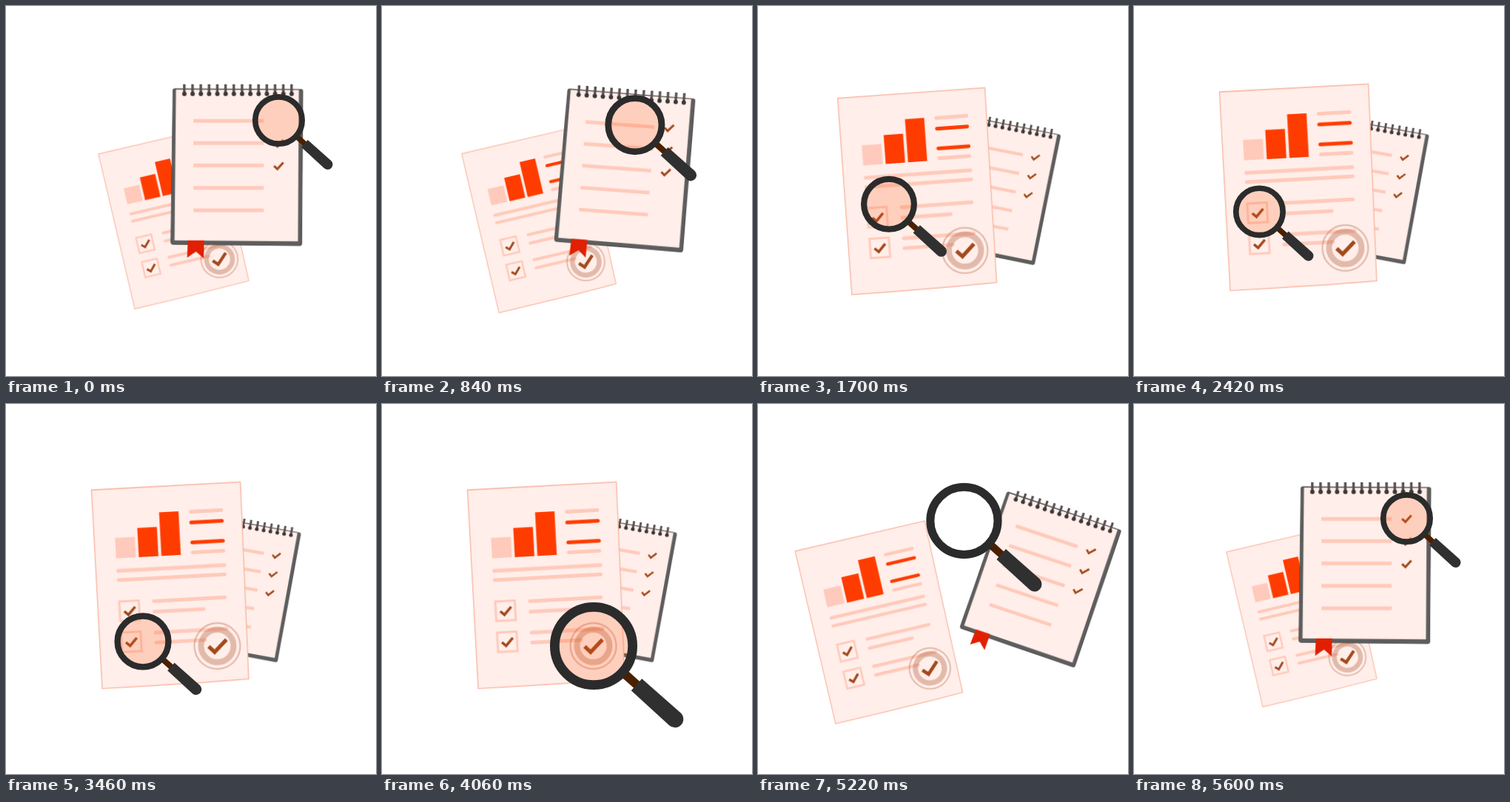
An HTML page without scripts that plays this animation: 500 px wide and 500 px high, repeating every 5620 ms.

```html
<!DOCTYPE html>
<html lang="en">
<head>
<meta charset="utf-8">
<title>Report check</title>
<style>
  html, body { margin: 0; width: 100%; height: 100%; overflow: hidden; background: #fff; }
  svg { position: absolute; left: 0; top: 0; width: 500px; height: 500px; }

  .report, .pad, .lens, .pad-layer, .draw {
    animation: 5620ms cubic-bezier(.65, 0, .35, 1) infinite;
  }
  .report { animation-name: report; }
  .pad { animation-name: pad; }
  .lens { animation-name: lens-move, lens-size; }
  .pad-layer { animation-name: stack; }
  .draw { stroke-dasharray: 1 2; animation-name: draw; animation-timing-function: ease-in-out; }
  .report-layer { z-index: 1; }
  .lens-layer { z-index: 3; }

  @keyframes report {
    0%, 10.68%, 99.64%, 100% { transform: translate(226.5px, 285.5px) rotate(-13.2deg) scale(.8); }
    22.06%, 87.9%, 90.39% { transform: translate(157.3px, 295px) rotate(-13.2deg) scale(.9); }
    33.63%, 73.84% { transform: translate(221.75px, 243.75px) rotate(-3.1deg) scale(1); }
  }
  @keyframes pad {
    0%, 10.68%, 99.64%, 100% { transform: translate(312.25px, 217.75px) rotate(0deg) scale(1); }
    22.06%, 87.9%, 90.39% { transform: translate(388.5px, 239px) rotate(20.2deg) scale(.92); }
    33.63%, 73.84% { transform: translate(309.6px, 248.3px) rotate(10deg) scale(.84); }
  }
  @keyframes lens-move {
    0%, 10.68%, 99.64%, 100% { translate: 368.5px 154.5px; }
    22.06% { translate: 242px 184px; }
    33.63%, 41.99% { translate: 169.5px 277.5px; }
    51.96%, 58.54% { translate: 170px 320px; }
    68.15%, 73.31% { translate: 286px 327px; }
    87.46%, 91.1% { translate: 274px 158px; }
  }
  @keyframes lens-size {
    0%, 10.68%, 33.63%, 58.54%, 99.29%, 100% { scale: 1; }
    22.06%, 68.15%, 87.9% { scale: 1.66; }
  }
  /* the pad and the report change places while they are apart */
  @keyframes stack {
    0%, 22.06%, 90.39%, 100% { z-index: 2; }
    22.07%, 90.38% { z-index: 0; }
  }
  @keyframes draw {
    0%, .5% { stroke-dashoffset: 1.02; }
    10.2%, 100% { stroke-dashoffset: 0; }
  }

  .paper { fill: #ffeee9; }
  .pale { fill: #ffcabb; }
  .hot { fill: #ff3c00; }
  .rule { fill: none; stroke: #ffcabb; stroke-width: 5; }
  .round { stroke-linecap: round; }
  .hot-rule { stroke: #ff3c00; }
  .box { stroke-width: 3; }
  .tick { fill: none; stroke: #a34a1e; stroke-width: 3; }
  .big { stroke-width: 5.2; }
  .seal { fill: none; stroke: #a8512b; stroke-opacity: .33; }
</style>
</head>
<body>

<svg class="report-layer" viewBox="0 0 500 500">
  <defs>
    <path id="tick" pathLength="1" d="M-6 0L-1.5 4.2L6.5-4.5"/>
    <path id="sheet" d="M-99.2-133.3L102.3-133L99.2 133.3Q30 135.6-99.2 135.6Z"/>
  </defs>
  <g class="report">
    <use href="#sheet" class="paper" stroke="#f9b8a4" stroke-width="1.4"/>
    <rect class="pale" x="-71" y="-66.7" width="26.8" height="27.6"/>
    <rect class="hot" x="-40.2" y="-78.5" width="26.5" height="39.5"/>
    <rect class="hot" x="-9.6" y="-98" width="26.2" height="59"/>
    <path class="rule round" d="M33-96.5H74.5M33-41.5H74.5M-69-22H74.5M-69-9.5H74.5
      M-23 21.6H73M-23 35.8H43.4M-23 64H73M-23 77.6H43"/>
    <path class="rule round hot-rule" d="M33-82H74.5M33-55H74.5"/>
    <rect class="rule box" x="-69.9" y="19.5" width="26.4" height="26.4"/>
    <rect class="rule box" x="-69.7" y="61.5" width="26.4" height="26.4"/>
    <g class="tick">
      <use href="#tick" transform="translate(-56.6 33) scale(1.2)"/>
      <use href="#tick" transform="translate(-56.6 75) scale(1.2)"/>
    </g>
    <g transform="translate(59.2 86.6)">
      <circle class="seal" r="31" stroke-width="2.2"/>
      <circle class="seal" r="22" stroke-width="8"/>
      <path class="tick big" d="M-11.7 0L-4 8L12.8-8"/>
    </g>
  </g>
</svg>

<svg class="pad-layer" viewBox="0 0 500 500">
  <defs>
    <path id="cover" d="M-84.5-106L87-105Q88.8-105 88.8-103L87.3 104Q87.3 106 85 106L-87 104.3Q-89.3 104-89.3 102L-86.5-104Q-86.5-106-84.5-106Z"/>
  </defs>
  <g class="pad">
    <use href="#cover" fill="#5e5e5e" stroke="#484848" stroke-width="1"/>
    <path class="paper" d="M-82.5-104.8L83.5-104.3L82.3 100.3L-84.5 99Z"/>
    <path fill="#e02000" d="M-66.5 99H-44.5L-45 123.5L-55.5 114L-67.5 122.5Z"/>
    <path class="rule" d="M-59-62.5H36M-59-32.4H36M-59-2.3H36M-59 28H36M-59 58.2H36"/>
    <g class="tick">
      <use href="#tick" class="draw" x="56" y="-62.7"/>
      <use href="#tick" x="56" y="-32.2"/>
      <use href="#tick" x="56" y="-1.7"/>
    </g>
    <!-- dashes make the row of rings and the row of holes -->
    <path d="M-73-106.5H76" fill="none" stroke="#5a4f4f" stroke-width="11" stroke-dasharray="3.4 7.75"/>
    <path d="M-71.2-99H74.5" fill="none" stroke="#3c3838" stroke-width="6" stroke-linecap="round" stroke-dasharray="0 11.15"/>
  </g>
</svg>

<svg class="lens-layer" viewBox="0 0 500 500">
  <mask id="sheets" maskUnits="userSpaceOnUse" x="0" y="0" width="500" height="500">
    <g fill="#fff">
      <g class="report"><use href="#sheet"/></g>
      <g class="pad"><use href="#cover"/></g>
    </g>
  </mask>
  <g mask="url(#sheets)">
    <circle class="lens" r="30" fill="#ff4d00" fill-opacity=".19"/>
  </g>
  <g class="lens">
    <g transform="rotate(42)">
      <rect x="34" y="-3.6" width="15" height="7.2" fill="#4a2000"/>
      <path fill="#303030" d="M47-6.5L89-6.9A6.9 6.9 0 0 1 89 6.9L47 6.5Z"/>
    </g>
    <circle r="31.7" fill="none" stroke="#2b2b2b" stroke-width="7.7"/>
  </g>
</svg>

</body>
</html>
```
